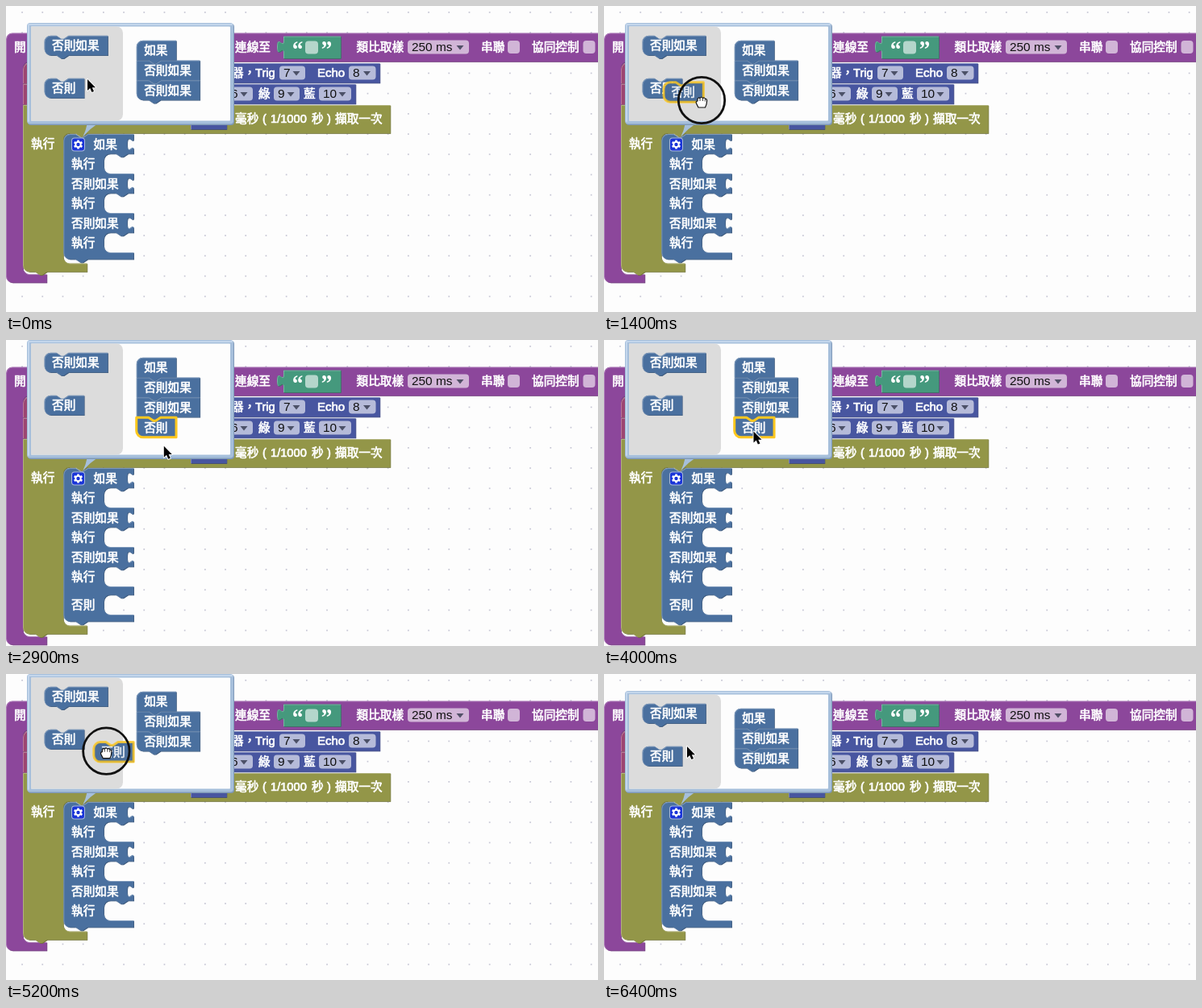
Animation of 734 by 380 pixels, one loop 6.5 s. Source, as an HTML page with a canvas:

```html
<!DOCTYPE html>
<html lang="zh-Hant">
<head>
<meta charset="utf-8">
<title>Block mutator</title>
<style>
html, body { margin: 0; width: 100%; height: 100%; overflow: hidden; background: #fdfdfd; }
canvas { display: block; width: 734px; height: 380px; }
</style>
</head>
<body>
<canvas id="stage" width="734" height="380"></canvas>
<script>
const ctx = document.getElementById('stage').getContext('2d');
const LOOP = 6500, STEP = 100, LAG = 60;
const FONT = '"Liberation Sans","Noto Sans CJK TC","Noto Sans CJK JP",sans-serif';
const PAPER = '#fdfdfd', WHITE = '#fff', INK = '#111', YELLOW = '#ffc81e';
const PURPLE = '#8c479b', OLIVE = '#939648', LOGIC = '#4a709f';
const SENSOR = '#4856a0', GREEN = '#45997d', VARIABLE = '#9c4672';
const FIELD = 'rgba(255,255,255,.6)';

const ROW = 24.5;
const NOTCH = 'l6,4 3,0 6,-4';
const NOTCH_BACK = 'l-6,4 -3,0 -6,-4';
const TOP_ROUND = 'a8,8 0 0 1 8,-8';
const BOTTOM_ROUND = 'a8,8 0 0 1 -8,-8 z';
const MOUTH = 'h-7 a8,8 0 0 0 -8,8';
const MOUTH_END = 'a8,8 0 0 0 8,8';

// Cursor stops: time, x, y; a trailing 1 eases the move that ends there.
const STOPS = [
  [0, 101, 91], [200, 101, 91], [900, 85, 107, 1], [1200, 85, 107],
  [1340, 110, 112], [1400, 121, 117], [1900, 201, 141], [2100, 203, 142],
  [2500, 196, 132, 1], [3500, 195.5, 131.5], [4200, 183, 109, 1], [4650, 183, 109],
  [4740, 176, 109], [4800, 161, 107], [5400, 106, 90], [5540, 104, 89],
  [5900, 104, 89], [6300, 103, 90, 1], [LOOP, 103, 90]
];

function cursorAt(t) {
  const i = Math.max(1, STOPS.findIndex(s => s[0] >= t));
  const a = STOPS[i - 1], b = STOPS[i];
  let k = (t - a[0]) / (b[0] - a[0]);
  if (b[3]) k = k * k * (3 - 2 * k);
  return { x: a[1] + (b[1] - a[1]) * k, y: a[2] + (b[2] - a[2]) * k };
}

function text(str, x, mid, size = 14.67) {
  ctx.font = `500 ${size}px ${FONT}`;
  ctx.fillStyle = ctx.strokeStyle = WHITE;
  ctx.lineWidth = 0.7;
  ctx.lineJoin = 'round';
  ctx.fillText(str, x, mid + 5.4);
  ctx.strokeText(str, x, mid + 5.4);
}

function box(x, y, w, h, r, color) {
  ctx.fillStyle = color;
  ctx.beginPath();
  ctx.roundRect(x, y, w, h, r);
  ctx.fill();
}

// Fills a block outline with a dark lower edge and a light upper edge.
function solid(d, color) {
  const path = new Path2D(d);
  ctx.save();
  ctx.translate(0.7, 0.7);
  ctx.fillStyle = color;
  ctx.fill(path);
  ctx.fillStyle = 'rgba(0,0,0,.25)';
  ctx.fill(path);
  ctx.restore();
  ctx.fillStyle = color;
  ctx.fill(path);
  ctx.save();
  ctx.clip(path);
  ctx.translate(0.5, 0.5);
  ctx.strokeStyle = 'rgba(255,255,255,.28)';
  ctx.lineWidth = 1;
  ctx.stroke(path);
  ctx.restore();
  return path;
}

function dropdown(x, mid, w, label) {
  box(x, mid - 8.5, w, 17, 4, FIELD);
  ctx.font = `15.4px ${FONT}`;
  ctx.fillStyle = INK;
  ctx.fillText(label, x + 5, mid + 5.4);
  const a = x + w - 11;
  ctx.fillStyle = 'rgba(50,55,75,.8)';
  ctx.beginPath();
  ctx.moveTo(a - 4.5, mid - 2);
  ctx.lineTo(a + 4.5, mid - 2);
  ctx.lineTo(a, mid + 3.5);
  ctx.fill();
}

function grid() {
  ctx.fillStyle = '#c6c6d4';
  for (let x = 20; x < 734; x += 25.2)
    for (let y = 7.8; y < 380; y += 25.2) ctx.fillRect(x - 0.8, y - 0.8, 1.7, 1.7);
}

function loopBlock(grow) {
  solid(`M0,41.5 ${TOP_ROUND} H744 V69 H51 ${NOTCH_BACK} H29 a8,8 0 0 0 -8,8 V${325 + grow}
    ${MOUTH_END} H50.5 v10.5 H8 ${BOTTOM_ROUND}`, PURPLE);
  text('開', 10, 51);
  text('連線至', 284, 51);
  solid('M344,37.5 H415 V65 H344 V58 c0,-10 -8,8 -8,-7.5 s8,2.5 8,-7.5 z', GREEN);
  ctx.font = '700 29px "Noto Serif","Liberation Serif",serif';
  ctx.fillStyle = WHITE;
  ctx.fillText('“', 354.5, 65);
  ctx.fillText('”', 390.5, 65);
  box(371, 43.5, 16, 16, 4, FIELD);
  text('類比取樣', 434.5, 51);
  dropdown(498, 51, 76, '250 ms');
  text('串聯', 589, 51);
  box(622, 43, 15, 16, 4, FIELD);
  text('協同控制', 652, 51);
  box(715.5, 43, 15, 16, 4, FIELD);
}

function sensorBlocks() {
  solid(`M21,78.5 ${TOP_ROUND} h7 ${NOTCH} H200 V96 H21 z`, VARIABLE);
  solid('M200,71 H463.5 V95.5 H200 z', SENSOR);
  text('器，', 280, 83);
  text('Trig', 309, 83);
  dropdown(339, 83, 32, '7');
  text('Echo', 386, 83, 15);
  dropdown(425, 83, 33.5, '8');
  solid(`M21,97 h15 ${NOTCH} H200 V122 H21 z`, VARIABLE);
  solid('M200,97 H433.5 V121.5 H200 z', SENSOR);
  dropdown(274, 109, 32, '6');
  text('綠', 313, 109);
  dropdown(332, 109, 32, '9');
  text('藍', 369, 109);
  dropdown(388, 109, 40, '10');
}

function timerBlock(grow) {
  solid(`M21,123 h15 ${NOTCH} H476.5 V158 H101 ${NOTCH_BACK} ${MOUTH} V${311.5 + grow} ${MOUTH_END}
    H100.5 v10.5 H51 ${NOTCH_BACK} H29 ${BOTTOM_ROUND}`, OLIVE);
  solid('M229,127 H273.5 V153 H229 z', SENSOR);
  text('毫秒', 284, 140);
  text('(', 318, 140);
  text('1/1000', 328, 140);
  text('秒', 379, 140);
  text(')', 398, 140);
  text('擷取一次', 408, 140);
  text('執行', 31, 171);
}

function gear(x, y) {
  box(x - 8.5, y - 8.5, 17, 17, 4, '#a9b9dc');
  box(x - 7.5, y - 7.5, 15, 15, 3, '#1a35d8');
  ctx.save();
  ctx.translate(x, y);
  ctx.fillStyle = WHITE;
  for (let i = 0; i < 6; i++) {
    ctx.rotate(Math.PI / 3);
    ctx.fillRect(-1.3, -5.6, 2.6, 3);
  }
  ctx.strokeStyle = WHITE;
  ctx.lineWidth = 2;
  ctx.beginPath();
  ctx.arc(0, 0, 3.2, 0, 7);
  ctx.stroke();
  ctx.restore();
}

function ifBlock(hasElse) {
  const x = 71.3, y = 159, right = 158.3;
  const value = 'v5 c0,10 -8,-8 -8,7.5 s8,-2.5 8,7.5 v4.5';
  const mouth = `H${x + 80} ${NOTCH_BACK} ${MOUTH} v8.5 ${MOUTH_END} H${right}`;
  solid(`M${x},${y + 8} ${TOP_ROUND} h7 ${NOTCH} H${right} ${(value + mouth).repeat(3)}
    ${hasElse ? 'v10.5' + mouth : ''} v8.5 H${x + 30} ${NOTCH_BACK} H${x + 8} ${BOTTOM_ROUND}`, LOGIC);
  gear(89.5, 172);
  text('如果', 108.5, 172);
  ['執行', '否則如果', '執行', '否則如果', '執行'].forEach((s, i) => text(s, 81, 196 + i * ROW));
  if (hasElse) text('否則', 81, 329);
}

// Small block of the editor: letters in kind switch on its parts.
// r/R round upper/lower corner, n notch, t tab.
function chip(label, x, mid, kind, selected) {
  const y = mid - 12.25, bottom = y + ROW, has = c => kind.includes(c);
  const w = label.length * 14.67 + 20;
  const d = (has('r') ? `M${x},${y + 8} ${TOP_ROUND}` : `M${x},${y}`) +
    (has('n') ? `H${x + 15} ${NOTCH}` : '') + `H${x + w} V${bottom}` +
    (has('t') ? `H${x + 30} ${NOTCH_BACK}` : '') +
    (has('R') ? `H${x + 8} ${BOTTOM_ROUND}` : `H${x} z`);
  const path = solid(d, LOGIC);
  text(label, x + 9.5, mid);
  if (selected) {
    ctx.strokeStyle = YELLOW;
    ctx.lineWidth = 3;
    ctx.stroke(path);
  }
}

function bubble(top) {
  const shade = '#a6bfdb', light = '#c3d6ec';
  ctx.fillStyle = shade;
  ctx.beginPath();
  ctx.moveTo(101, 145);
  ctx.quadraticCurveTo(99, 155, 95, 163);
  ctx.quadraticCurveTo(105, 151, 116, 145);
  ctx.fill();
  box(27, top + 1, 256, 147 - top, 4, '#7f99b8');
  box(26, top, 256, 146.5 - top, 4, shade);
  box(27, top + 1, 254, 2, 2, light);
  box(27, top + 2, 2, 142 - top, 1, light);
  box(31, top + 4.5, 247, 138 - top, 1, PAPER);
  box(31, top + 4.5, 114, 138 - top, [0, 8, 8, 0], '#dcdcdc');
}

function joinMark(x, y) {
  ctx.strokeStyle = YELLOW;
  ctx.lineWidth = 4;
  ctx.stroke(new Path2D(`M${x + 8},${y} h7 ${NOTCH}`));
}

// Position of the loose or newly attached block, or null.
function movingBlock(t) {
  const c = cursorAt(Math.max(0, t - LAG));
  if (t >= 1250 && t < 2900) return { x: c.x - 36, mid: c.y - 5, drag: true };
  if (t >= 2900 && t < 4700) return { x: 161.7, mid: 108.5, drag: false };
  if (t >= 4700 && t < 5800) return { x: c.x - 21, mid: c.y - 0.5, drag: true };
  return null;
}

function editor(t) {
  const dy = t >= 2900 && t < 5800 ? -21 : 0;
  bubble(21 + dy);
  ctx.save();
  ctx.beginPath();
  ctx.rect(31, 25 + dy, 247, 118 - dy);
  ctx.clip();
  chip('否則如果', 47.5, 49 + dy, 'rntR');
  chip('否則', 47.5, 102 + dy, 'rnR');
  const block = movingBlock(t);
  const joined = block && !block.drag;
  chip('如果', 161.7, 55 + dy, 'rt');
  chip('否則如果', 161.7, 79.7 + dy, 'nt');
  chip('否則如果', 161.7, 104.5 + dy, joined ? 'nt' : 'ntR');
  if (block) {
    const joinY = 117.5 + dy;
    const near = Math.hypot(block.x - 162, block.mid - 12.25 - joinY) < 22;
    if (block.drag && near) joinMark(162, joinY);
    ctx.globalAlpha = block.drag ? 0.8 : 1;
    chip('否則', block.x, block.mid, joined ? 'nR' : 'rnR', true);
  }
  ctx.restore();
}

function cursor(t) {
  const p = cursorAt(t);
  const pressed = (t >= 1100 && t < 2900) || (t >= 4500 && t < 5800);
  ctx.save();
  ctx.translate(p.x, p.y);
  ctx.lineJoin = 'round';
  if (pressed) {
    ctx.strokeStyle = INK;
    ctx.lineWidth = 2.8;
    ctx.beginPath();
    ctx.arc(0, 0, 28.7, 0, 7);
    ctx.stroke();
    const hand = new Path2D(`M-4,9 L-6.5,4 Q-7.5,1 -5,1 V-1.5 Q-4,-4 -2,-2.5 Q0,-5 1.5,-2.5
      Q3.5,-4 4.5,-1.5 Q7,-2 6.5,1.5 Q6.5,5 4.5,9 z`);
    ctx.lineWidth = 1.2;
    ctx.fillStyle = WHITE;
    ctx.fill(hand);
    ctx.stroke(hand);
    ctx.lineWidth = 0.8;
    ctx.stroke(new Path2D('M-2,-2 V1 M1.5,-2 V1 M4.3,-1 V1.5'));
  } else {
    const arrow = new Path2D('M0,0 V14 L3.2,11 5.4,16 8,15 5.8,10.2 H10 z');
    ctx.strokeStyle = WHITE;
    ctx.lineWidth = 1.8;
    ctx.stroke(arrow);
    ctx.fillStyle = '#000';
    ctx.fill(arrow);
  }
  ctx.restore();
}

function draw(t) {
  const hasElse = t >= 2900 && t < 4700;
  const grow = hasElse ? 35 : 0;
  ctx.fillStyle = PAPER;
  ctx.fillRect(0, 0, 734, 380);
  grid();
  loopBlock(grow);
  sensorBlocks();
  timerBlock(grow);
  ifBlock(hasElse);
  editor(t);
  cursor(t);
}

const start = performance.now();
function tick() {
  const t = (performance.now() - start) % LOOP;
  draw(Math.floor(t / STEP) * STEP);
  requestAnimationFrame(tick);
}
tick();
</script>
</body>
</html>
```
